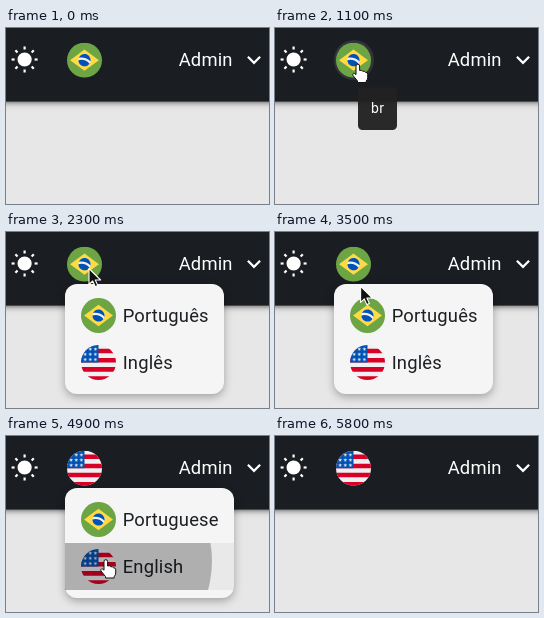
Animation, 263 px wide and 176 px high, one loop 7700 ms. Source, as an HTML page:

```html
<!DOCTYPE html>
<html lang="pt">
<head>
<meta charset="utf-8">
<title>Language menu</title>
<style>
html, body { margin: 0; width: 100%; height: 100%; overflow: hidden; background: #e7e7e7; }
svg { display: block; }
text { font: 18.4px Roboto, sans-serif; letter-spacing: .17px; fill: #1c1f23; }
.light { fill: #fff; }
#bar { fill: #1a1d21; filter: drop-shadow(0 1px 2px rgba(0,0,0,.4)) drop-shadow(0 2px 3px rgba(0,0,0,.2)); }
#menu { filter: drop-shadow(0 3px 4px rgba(0,0,0,.3)); }
#tip text { font-size: 14px; letter-spacing: .3px; text-anchor: middle; }
</style>
</head>
<body>
<svg width="263" height="176" viewBox="0 0 263 176">
  <defs>
    <clipPath id="disc"><circle cx="256" cy="256" r="256"/></clipPath>
    <pattern id="stars" width="75" height="76" x="24" y="22" patternUnits="userSpaceOnUse">
      <path fill="#f0f0f0" d="M37 10l7 20h21L48 43l6 20-17-12-17 12 6-20L9 30h21z"/>
    </pattern>
    <symbol id="br" viewBox="0 0 512 512">
      <circle cx="256" cy="256" r="256" fill="#6da544"/>
      <path fill="#ffda44" d="M256 100L467 256 256 412 45 256z"/>
      <circle cx="256" cy="256" r="89" fill="#f0f0f0"/>
      <path fill="#0052b4" d="M211 250c-15 0-30 3-44 7 0 49 40 88 89 88 30 0 57-15 73-38-28-34-70-57-118-57zM343 273c1-5 2-11 2-17 0-49-40-89-89-89-37 0-68 22-82 54 12-3 25-4 37-4 52 0 99 22 132 56z"/>
    </symbol>
    <symbol id="us" viewBox="0 0 512 512">
      <g clip-path="url(#disc)">
        <path fill="#f0f0f0" d="M0 0h512v512H0z"/>
        <path stroke="#d80027" stroke-width="67" d="M0 89h512M0 223h512M0 356h512M0 490h512"/>
        <path fill="#0052b4" d="M0 0h256v256H0z"/>
        <path fill="url(#stars)" d="M0 0h256v256H0z"/>
      </g>
    </symbol>
  </defs>

  <rect id="bar" x="-20" y="-20" width="303" height="93.6"/>
  <g class="light" stroke="#fff" stroke-width="2.2">
    <circle cx="18.6" cy="31.5" r="6" />
    <g id="rays"></g>
  </g>
  <circle id="ring" cx="79" cy="32" r="20" fill="#fff" fill-opacity=".1"/>
  <use id="current" x="61" y="14.7" width="35" height="35"/>
  <text class="light" x="172.7" y="38">Admin</text>
  <path class="light" transform="translate(234.2 18) scale(1.15)" d="M16.6 8.6L12 13.2 7.4 8.6 6 10l6 6 6-6z"/>

  <g id="tip">
    <rect x="83" y="59.5" width="39" height="42.5" rx="4.5" fill="#222" fill-opacity=".96"/>
    <text class="light" x="102.7" y="85">br</text>
  </g>

  <g id="menu">
    <rect id="paper" height="110" rx="12" fill="#f5f5f5"/>
    <rect id="hover" height="47" fill-opacity=".05"/>
    <use class="flag" href="#br" x="-17.5" y="-17.5" width="35" height="35"/>
    <use class="flag" href="#us" x="-17.5" y="-17.5" width="35" height="35"/>
    <text id="first" x="57.7" y="38"></text>
    <text id="second" x="57.7" y="85"></text>
    <svg id="item" y="55" height="47"><circle id="ripple" cx="41" cy="18" fill-opacity=".25"/></svg>
  </g>

  <path id="arrow" fill="#111" stroke="#fff" stroke-width="1.1" stroke-linejoin="round"
    d="M0 0V16l3.7-3.5 2.5 5.7 2.6-1.1-2.5-5.6h5.3z"/>
  <path id="hand" fill="#fff" stroke="#111" stroke-width="1" stroke-linejoin="round"
    d="M-2 10V1.5a1.8 1.8 0 013.6 0V6q2.3-1 3 .8 2.2-.7 2.8 1 2.3-.3 2.3 2V13q0 2-1.5 3.5V18H-.5v-1.5L-5 11q-.8-1.6.6-2.2 1.2-.3 2.4 1.4z"/>
</svg>
<script>
const LOOP = 7700, STEP = 100;
const $ = id => document.getElementById(id);
const set = (el, attrs) => { for (const k in attrs) el.setAttribute(k, attrs[k]); };
const show = (id, on) => $(id).style.display = on ? '' : 'none';
const span = (t, a, b) => Math.min(1, Math.max(0, (t - a) / (b - a)));
const easeOut = (p, power) => 1 - (1 - p) ** power;
const flags = document.querySelectorAll('.flag');

for (let a = 0; a < 360; a += 45)
  $('rays').innerHTML += `<path transform="translate(18.6 31.5) rotate(${a})" d="M0-10V-13"/>`;

// Cursor legs: start, end, easing power, from x, y, to x, y
const legs = [
  [0, 600, 1.75, 84, 181, 83, 36.5],
  [3400, 4100, 1.45, 82, 37, 100, 124],
  [5000, 5800, 1.2, 100, 124, 275, -12]
];

function cursor(t) {
  const [a, b, power, x0, y0, x1, y1] = legs.findLast(leg => t >= leg[0]);
  const p = easeOut(span(t, a, b), power);
  return [x0 + (x1 - x0) * p, y0 + (y1 - y0) * p];
}

function draw(t) {
  const [x, y] = cursor(t);
  const english = t >= 4900;
  const open = t > 1800 && t < 5300;
  const overFlag = t < 1800 && y < 52;
  const row = t >= 3400 && t < 5100 && y >= 60 ? (y < 107 ? 1 : 2) : 0;
  const hand = overFlag || row > 0;

  show('ring', overFlag);
  show('tip', t >= 1100 && t < 1800);
  set($('current'), { href: english ? '#us' : '#br' });

  show('menu', open);
  const opening = span(t, 1800, 2200), closing = span(t, 4900, 5300);
  const scale = 1 - .25 * (1 - opening) ** 6 - .25 * closing ** 2;
  const width = english ? 169 : 159;
  set($('menu'), {
    transform: `translate(59 52) scale(${scale} ${scale ** 2})`,
    opacity: easeOut(opening, 2.8) * (1 - closing) ** 1.5
  });
  set($('paper'), { width });
  set($('hover'), { width, y: row === 1 ? 8 : 55 });
  show('hover', row);
  const squash = 1 - .4 * (1 - opening) ** 2;
  flags.forEach((flag, i) =>
    set(flag, { transform: `translate(33.5 ${31.5 + 47 * i}) scale(${squash} 1)` }));
  $('first').textContent = english ? 'Portuguese' : 'Português';
  $('second').textContent = english ? 'English' : 'Inglês';
  set($('item'), { width });
  set($('ripple'), { r: t < 4700 ? 0 : 106 * (t - 4650) / 250 });

  const visible = t >= 100 && t < 5800;
  show('arrow', visible && !hand);
  show('hand', visible && hand);
  set($(hand ? 'hand' : 'arrow'), { transform: `translate(${x} ${y})` });
}

function tick() {
  draw(Math.floor(performance.now() % LOOP / STEP) * STEP);
  requestAnimationFrame(tick);
}
tick();
</script>
</body>
</html>
```
